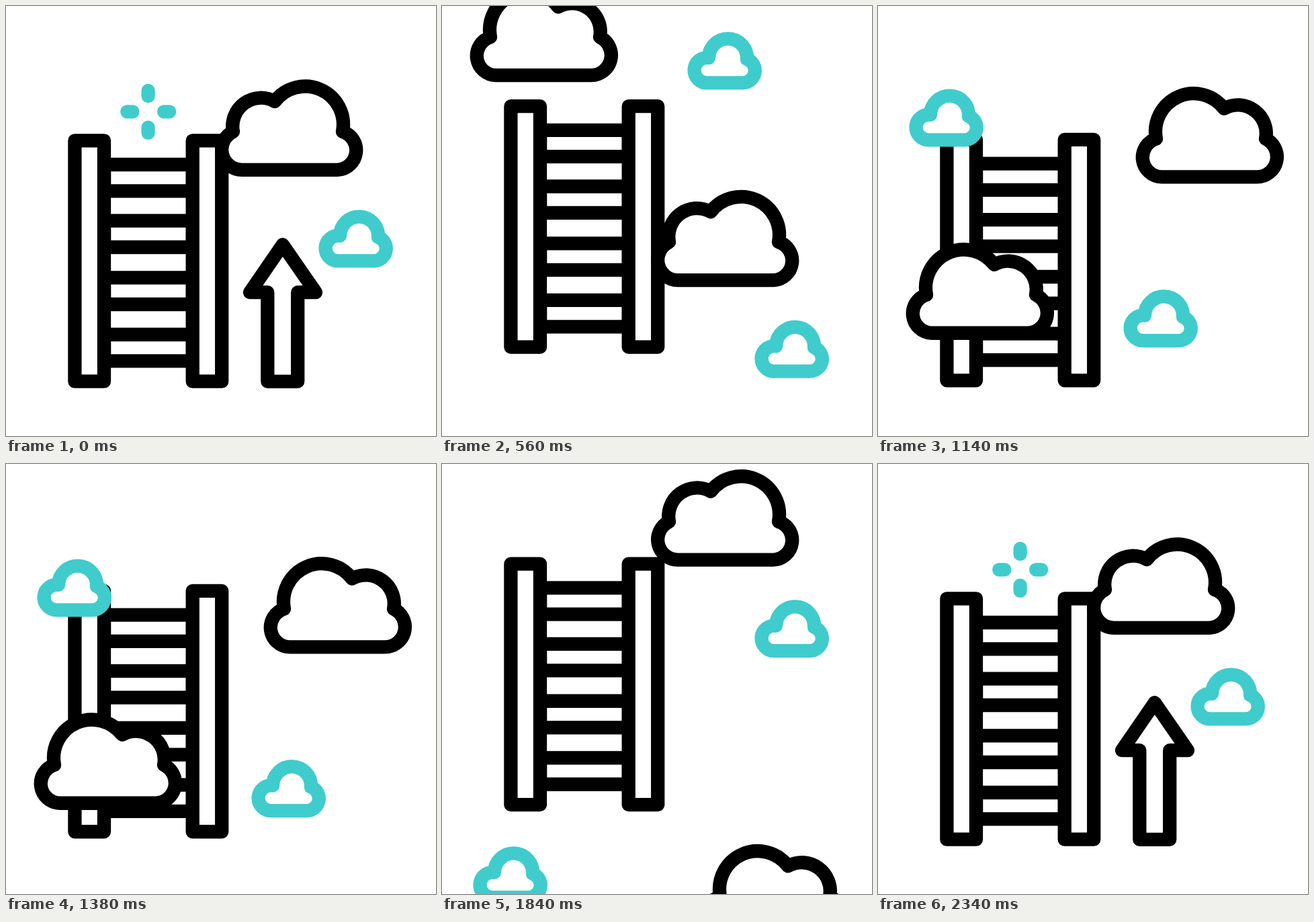
These frames come from a looping animation (640x640 px, 2400 ms). An HTML page:

```html
<!DOCTYPE html>
<html lang="en">
<head>
<meta charset="utf-8">
<title>Ladder to the clouds</title>
<style>
  html, body { margin: 0; height: 100%; overflow: hidden; background: #fff; }
  svg { display: block; width: 100%; height: 100%; }
</style>
</head>
<body>
<svg viewBox="0 0 640 640" fill="#fff" stroke="#000" stroke-width="20.3" stroke-linejoin="round" stroke-linecap="round">
  <defs>
    <path id="big" d="M351 243.8A29.9 29.9 0 0 1 338 187A42.3 42.3 0 0 1 400 142A56.8 56.8 0 0 1 501 187A29.1 29.1 0 0 1 493 243.8Z"/>
    <path id="small" stroke="#40cccc" d="M495 379.4A18.8 18.8 0 1 1 497 342A28.53 28.53 0 1 1 554 344A18.3 18.3 0 0 1 547.7 379.4Z"/>
  </defs>
  <g id="sparkle" stroke="#40cccc">
    <path d="M211.6 126V134M211.6 180.6V188.8M180.2 157.3H188.4M235.1 157.3H243.2"/>
  </g>
  <path id="arrow" d="M411.8 355.2L363 426.2H389.3V558.8H434.2V426.2H461Z"/>
  <g id="ladder">
    <path d="M146 236H278V275.3H146ZM146 319.6H278V359H146ZM146 404.4H278V444H146ZM146 489H278V528.4H146Z"/>
    <path d="M102.4 200.3H146V558.7H102.4ZM277.7 200.3H321.2V558.7H277.7Z"/>
  </g>
  <g id="clouds">
    <use href="#big"/>
    <use href="#small"/>
    <use href="#big" transform="translate(573 -305) scale(-1 1)"/>
    <use href="#small" transform="translate(-100 -429.3)"/>
    <use href="#big" transform="translate(915 -537.3) scale(-1 1)"/>
    <use href="#small" transform="translate(-419 -728)"/>
    <use href="#big" y="-1095"/>
    <use href="#small" y="-1095"/>
  </g>
</svg>
<script>
  const LOOP = 2400, START = 200, MIDDLE = 1200, END = 2345;
  const part = id => document.getElementById(id);
  const [sparkle, arrow, ladder, clouds] = ['sparkle', 'arrow', 'ladder', 'clouds'].map(part);

  const progress = (t, from, to) => Math.min(1, Math.max(0, (t - from) / (to - from)));
  const smooth = u => u * u * (3 - 2 * u);
  const ease = (t, from, to) => smooth(progress(t, from, to));

  // Cubic Bezier timing (k, 0, 1 - k, 1), solved by bisection
  function steepEase(t, from, to, k) {
    const x = progress(t, from, to);
    let low = 0, high = 1;
    for (let i = 0; i < 24; i++) {
      const u = (low + high) / 2, v = 1 - u;
      if (3 * v * v * u * k + 3 * v * u * u * (1 - k) + u ** 3 < x) low = u;
      else high = u;
    }
    return smooth(low);
  }

  const shift = (el, y) => el.setAttribute('transform', `translate(0 ${y})`);

  function draw(t) {
    shift(clouds, 553.5 * ease(t, START, MIDDLE) + 541.5 * steepEase(t, MIDDLE, 2245, 0.744));

    const lift = ease(t, START, 600) - ease(t, 600, MIDDLE) + ease(t, MIDDLE, 1800) - ease(t, 1800, END);
    shift(ladder, -52.5 * lift);

    // The arrow leaves upwards and returns from below
    shift(arrow, t < MIDDLE ? -640 * ease(t, START, 600) : 320 * (1 - ease(t, 1800, END)));

    const size = 1 - ease(t, START, 520) + ease(t, 1900, END);
    sparkle.setAttribute('transform', `translate(211.6 157.3) scale(${size}) translate(-211.6 -157.3)`);
    sparkle.setAttribute('visibility', size > 0.001 ? 'visible' : 'hidden');
  }

  const begin = performance.now();
  function tick() {
    const t = (performance.now() - begin) % LOOP;
    draw(t < START || t >= 2340 ? 0 : t);
    requestAnimationFrame(tick);
  }
  tick();
</script>
</body>
</html>
```
